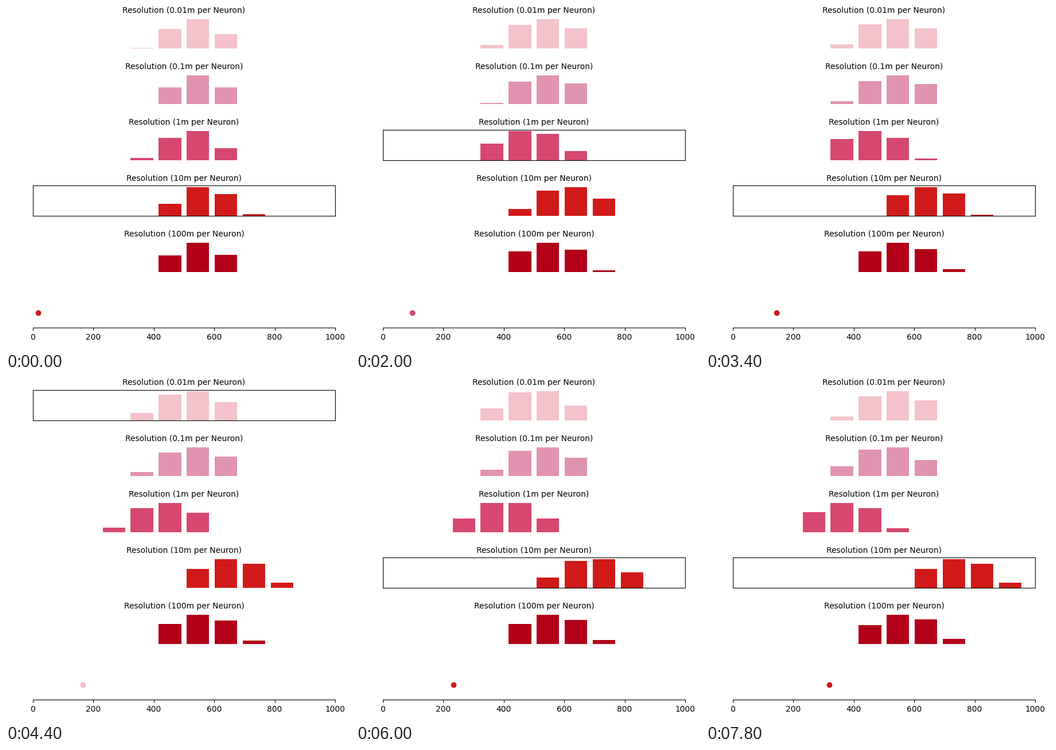
A matplotlib script for the animation above (8000 ms loop, 600 by 600 pixels).

```python
import numpy as np
import matplotlib.pyplot as plt
from matplotlib.animation import FuncAnimation
from matplotlib.colors import to_rgb

SIZE, DPI = 600, 100
FRAMES, INTERVAL = 40, 200
LEFT, WIDTH, HEIGHT = 46.73, 527.4, 53
BOTTOM, PITCH = 38.9, 97.5
CELLS = np.arange(10)
REACH = 2  # half width of an activity bump, in cells

plt.rcParams["font.family"] = "DejaVu Sans"
plt.rcParams["font.size"] = 10

# Scale in use at each step: 10m, apart from two slow spells
scales = np.full(FRAMES, 3)
scales[10:13] = scales[20:24] = 2
scales[22] = 0

# Fast steps grow slightly longer, slow ones barely move the dot
steps = np.choose(scales, [0, 0, 2, 8.3 + 0.035 * np.arange(FRAMES), 0])
steps[0] = 18
dot_x = np.cumsum(steps)

# Label, colour and bump centre (in cells) of each scale
PANELS = [
    ("0.01m", "#f4c2cb", lambda n: 4.88 - 0.36 * np.exp(-((n - 28) / 6) ** 2)),
    ("0.1m", "#e094b2", lambda n: 5 - 0.35 * (n / 39) ** 1.5),
    ("1m", "#d64870", lambda n: 4.75 - 0.0415 * n),
    ("10m", "#d01a1a", lambda n: 5.11 + 0.0065 * dot_x[n]),
    ("100m", "#b10018", lambda n: 5.01 + 0.0045 * n),
]

fig = plt.figure(figsize=(SIZE / DPI, SIZE / DPI), dpi=DPI, facecolor="white")


def add_axes(row):
    """Axes in the given row, counted from the bottom."""
    y = BOTTOM + PITCH * row
    ax = fig.add_axes([LEFT / SIZE, y / SIZE, WIDTH / SIZE, HEIGHT / SIZE])
    ax.patch.set_visible(False)
    ax.set_yticks([])
    return ax


def add_panel(row, label, color):
    ax = add_axes(row)
    ax.set_xticks([])
    ax.set_title(f"Resolution ({label} per Neuron)", fontsize=10)
    bars = ax.bar(CELLS, 0 * CELLS, color=color)
    ax.set_xlim(-0.89, 9.89)
    ax.set_ylim(0, 1.05)
    return ax, bars


def bump(center, frame):
    """Parabolic bump with peak 1, sharper while the activity settles."""
    power = 1 + 0.9 * np.exp(-frame / 3)
    h = np.clip(1 - ((CELLS - center) / REACH) ** 2, 0, None) ** power
    return h / h.max()


panels = [add_panel(5 - i, label, color)
          for i, (label, color, _) in enumerate(PANELS)]

track = add_axes(0)
track.set_xlim(0, 1000)
track.set_ylim(-1, 1)
track.spines[["left", "right", "top"]].set_visible(False)
dot = track.scatter([0], [0], s=36, linewidths=1)


def update(frame):
    active = scales[frame]
    for i, (ax, bars) in enumerate(panels):
        center = PANELS[i][2](frame)
        for bar, h in zip(bars, bump(center, frame)):
            bar.set_height(h)
        ax.spines[:].set_visible(i == active)
    color = np.array(to_rgb(PANELS[active][1]))
    dot.set_offsets([[dot_x[frame], 0]])
    dot.set_facecolor(color)
    dot.set_edgecolor(color * 0.95)
    return []


anim = FuncAnimation(fig, update, frames=FRAMES, interval=INTERVAL,
                     init_func=lambda: update(0), repeat=True, repeat_delay=0)
plt.show()
```
